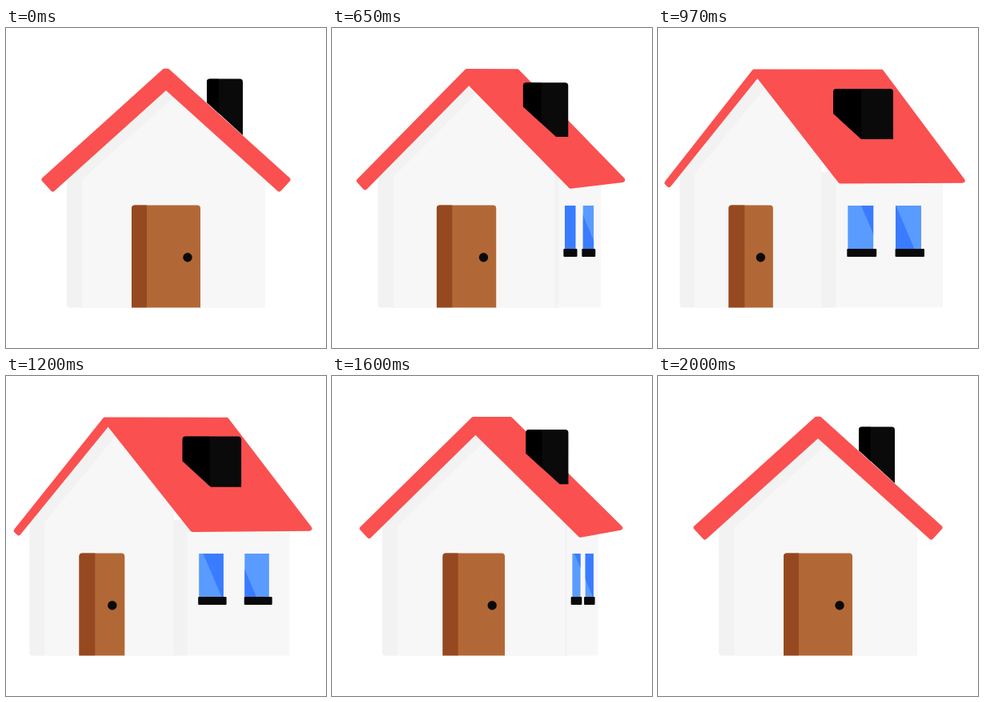
These frames come from a looping animation (400x400 px, 2.02 s). An HTML page with a canvas:

```html
<!DOCTYPE html>
<html>
<head>
<meta charset="utf-8">
<title>House</title>
<style>
html, body { margin: 0; width: 100%; height: 100%; overflow: hidden; background: #fff; }
canvas { display: block; }
</style>
</head>
<body>
<canvas width="400" height="400"></canvas>
<script>
const ctx = document.querySelector('canvas').getContext('2d');
const LOOP = 2020, BASE = 349.5;
const RED = '#fa5050', WALL = '#f7f7f7', SHADE = '#f2f2f2', BLACK = '#0a0a0a';
const LIGHT = '#599bff', DARK = '#3a7cff';
let turn = 0; // 0 = front view, 1 = fully turned

const mix = (a, b, k = turn) => a + (b - a) * k;

// cubic-bezier(a, 0, b, 1)
function ease(x, a, b) {
  let lo = 0, hi = 1;
  for (let i = 0; i < 24; i++) {
    const s = (lo + hi) / 2, r = 1 - s;
    if (3 * s * r * r * a + 3 * s * s * r * b + s ** 3 < x) lo = s; else hi = s;
  }
  return lo * lo * (3 - 2 * lo);
}

function turnAt(t) {
  if (t < 500 || t >= 2000) return 0;
  return t < 1000 ? ease((t - 500) / 500, .25, .4) : 1 - ease((t - 1000) / 1000, .6, .4);
}

// Left edge of the window reflection: [time, x]
const GLINT = [[500, 302], [770, 236], [970, 254], [1370, 241], [1600, 303], [2020, 303]];
function glintAt(t) {
  const i = Math.max(1, GLINT.findIndex(k => k[0] > t));
  const [t0, x0] = GLINT[i - 1], [t1, x1] = GLINT[i];
  return mix(x0, x1, Math.max(0, (t - t0) / (t1 - t0)));
}

// Polygon from [x, y, corner radius]
function path(pts) {
  const last = pts[pts.length - 1];
  ctx.beginPath();
  ctx.moveTo((pts[0][0] + last[0]) / 2, (pts[0][1] + last[1]) / 2);
  pts.forEach(([x, y, r = 0], i) => {
    const [nx, ny] = pts[(i + 1) % pts.length];
    if (r) ctx.arcTo(x, y, nx, ny, r); else ctx.lineTo(x, y);
  });
  ctx.closePath();
}

function fill(color, pts) {
  path(pts);
  ctx.fillStyle = color;
  ctx.fill();
}

const rect = (color, x0, y0, x1, y1, top = 0, bottom = 0) =>
  fill(color, [[x0, y0, top], [x1, y0, top], [x1, y1, bottom], [x0, y1, bottom]]);

// Fill a shape, then draw details clipped to it
function clipped(color, pts, details) {
  ctx.save();
  fill(color, pts);
  ctx.clip();
  details();
  ctx.restore();
}

function walls() {
  const left = mix(76, 27), corner = mix(324, 204), right = mix(324, 356);
  const apex = mix(200, 124);
  rect(WALL, corner - 5, 180, right, BASE, 0, mix(4, 1));
  if (turn > .02) rect(SHADE, corner - 5, 180, corner + 18 * turn ** 1.5, BASE);
  clipped(SHADE, [
    [left, BASE, 4], [left, mix(178, 176)], [apex, mix(68, 57)],
    [corner, mix(178, 155)], [corner, BASE, mix(4, 0)]
  ], () => fill(WALL, [
    [left + 19, BASE], [left + 19, mix(189.6, 182)], [apex + 19, mix(78, 63)],
    [corner + 19, mix(78, 63)], [corner + 19, BASE]
  ]));
}

function door() {
  const left = mix(157, 88), right = mix(243, 143.5);
  clipped('#b26836', [[left, 221.5, 4], [right, 221.5, 4], [right, BASE], [left, BASE]],
    () => rect('#964920', left, 221, mix(176, 108), BASE));
  ctx.beginPath();
  ctx.arc(mix(227, 128), 286.7, 5.7, 0, 7);
  ctx.fillStyle = BLACK;
  ctx.fill();
}

function pane(x0, x1, sill0, sill1, glint) {
  clipped(LIGHT, [[x0, 222], [x1, 222], [x1, 277], [x0, 277]], () =>
    fill(DARK, [[glint, 222], [glint + 43.5, 222], [glint + 66.9, 277], [glint + 23.4, 277]]));
  rect(BLACK, sill0, 276, sill1, 286, 1, 1);
}

function windows(glint) {
  if (turn < .004) return;
  pane(mix(324, 237), mix(326, 269), mix(322, 236), mix(327, 273), glint);
  pane(mix(324, 297), mix(326, 329), mix(322, 296.5), mix(327, 333), glint);
}

function roof() {
  path([
    [mix(198, 120), mix(53.8, 54.5)], [mix(202, 279.5), mix(53.8, 54.8)],
    [mix(352.5, 380.8), mix(189.5, 190.7)], [mix(341.5, 227.5), mix(201.5, 191.5)],
    [mix(200, 124), mix(74, 58.2)], [mix(58.5, 13.5), mix(201.5, 196)],
    [mix(47.5, 11), mix(189.5, 193.5)]
  ]);
  ctx.fillStyle = ctx.strokeStyle = RED;
  ctx.lineWidth = 6;
  ctx.lineJoin = 'round';
  ctx.fill();
  ctx.stroke();
}

function chimney() {
  const left = mix(251, 219), right = mix(296, 294), top = mix(63.5, 76);
  clipped(BLACK, [
    [left, top, 4], [right, top, 4], [right, mix(134, 139)],
    [mix(296, 254), mix(134, 139)], [left, mix(93, 107)]
  ], () => rect('#000', left, top, mix(266, 254), 140));
}

function draw(now) {
  const t = now % LOOP;
  turn = turnAt(t);
  ctx.fillStyle = '#fff';
  ctx.fillRect(0, 0, 400, 400);
  walls();
  door();
  windows(glintAt(t));
  roof();
  chimney();
  requestAnimationFrame(() => draw(performance.now()));
}
draw(0);
</script>
</body>
</html>
```
